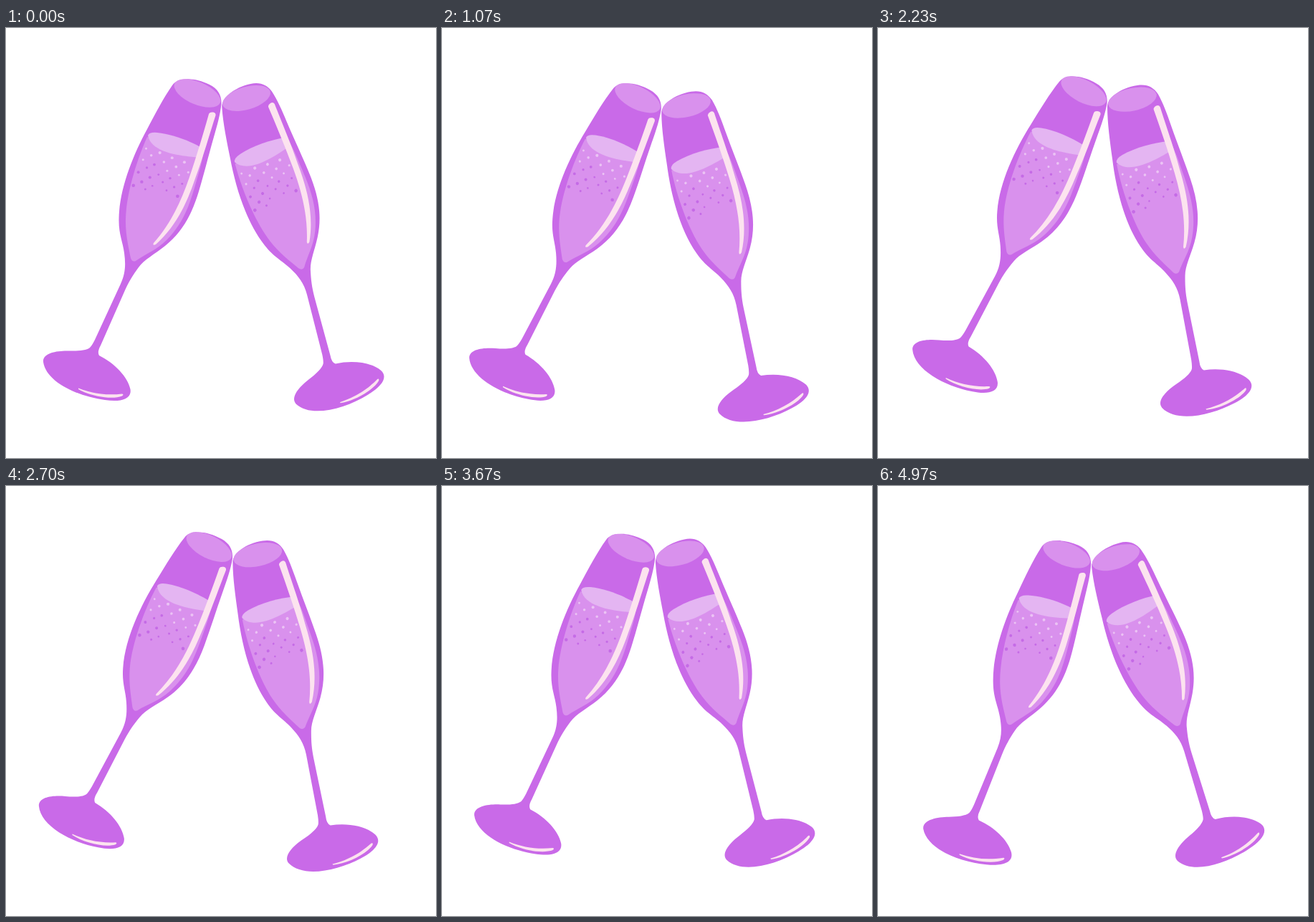
An HTML page that plays this animation: 600 by 600 pixels, repeating every 5.01 s.

```html
<!DOCTYPE html>
<html lang="en">
<head>
<meta charset="utf-8">
<title>Clinking glasses</title>
<style>
html, body { margin: 0; height: 100%; overflow: hidden; background: #fff; }
svg { display: block; width: 100vw; height: 100vh; }
</style>
</head>
<body>
<svg viewBox="0 0 600 600">
  <g id="pair">
    <g id="glass">
      <path fill="#c96ae8" d="M232 80C239 69 262 68 284 79C296 85 301 94 300.500 106C299 120 295 135 290 152C282 180 276 205 269 228C260 258 247 284 222 304C207 316 193 323 185 334C177 345 172 353 166 366L132 443Q127 452 130 457C152 468 170 487 173.500 504C176 519 158 522 138 519C100 514 56 494 52 466C51 453 72 450 88 450.500C100 451 112 450 117 446Q120 443 124 435L160 357C167 342 167 329 165 314C163 298 157 288 157.500 266C158 225 177 178 196.500 142C208 120 220 97 232 80Z"/>
      <ellipse fill="#d991ed" rx="34.5" ry="15.8" transform="translate(267 91) rotate(23)"/>
      <path fill="#d991ed" d="M197 152C182 185 168 232 167 266C166.500 288 171 305 174 321Q176 327 181 325C195 315 210 310 224 296C250 270 258 240 265 216C269 202 273 190 275 176Z"/>
      <path fill="#e4b5f2" d="M198 150Q200 145 211 146C232 148 258 158 275 168L274 181C246 179 203 175 198 150Z"/>
      <g id="bubbles"></g>
      <path fill="#fce3ef" d="M283 120Q284 117 289 117.500Q293 118 292.500 122C285 145 274 184 264 210C252 246 236 278 209 302Q204 304 206 300C228 275 243 246 256 208C265 182 276 145 283 120Z"/>
      <path fill="#fce3ef" d="M101 502.500C120 510 140 513 162 510.500Q165 511 162 513.500C148 519 118 514 101 504Z"/>
    </g>
    <use href="#glass" transform="translate(335.500 98) rotate(-39.05) translate(-267 -91)"/>
  </g>
</svg>
<script>
const LOOP = 5010, STEP = LOOP / 150;

let seed = 7;
const random = () => (seed = seed * 16807 % 2147483647) / 2147483647;

// Bubbles: staggered rows parallel to the liquid surface, pale on top, dark below
let bubbles = '';
for (let row = 0; row < 7; row++) {
  for (let i = 0; i < (row < 6 ? 4 : 2); i++) {
    const col = i + row % 2 / 2;
    const x = 197 + 17 * col - 3.4 * row + 3 * (random() - .5);
    const y = 167 + 7 * col + 8.6 * row + 3 * (random() - .5);
    const color = row + 3 * random() < 4 ? '#ebc3f4' : '#c56be6';
    bubbles += `<circle cx="${x}" cy="${y}" r="${1.2 + 1.2 * random()}" fill="${color}"/>`;
  }
}
document.getElementById('bubbles').innerHTML = bubbles;

// Turning points of the drift: seconds, contact point x and y, tilt in degrees
const keys = [
  [0, 300, 104, 2.8], [.63, 305.3, 109, 6.5], [.95, 307, 113, 6.8], [1.47, 294, 109, 0],
  [1.95, 320, 110, 7], [2.23, 319, 103, 6.5], [2.67, 315.5, 100, 6.3], [3.2, 314.5, 100.3, 8.8],
  [3.7, 295.3, 100, 2.9], [4.27, 290.6, 108, 1], [4.98, 297, 107, .5]];
const last = keys.length - 1;

const rise = (i, k) => (keys[i + 1][k] - keys[i][k]) / (keys[i + 1][0] - keys[i][0]);

// Monotone slope, so the curve never overshoots its keys
function slope(i, k) {
  const a = rise(Math.max(i - 1, 0), k), b = rise(Math.min(i, last - 1), k);
  return a * b > 0 ? 2 * a * b / (a + b) : 0;
}

function valueAt(t, k) {
  let i = 0;
  while (i < last - 1 && t >= keys[i + 1][0]) i++;
  const a = keys[i], b = keys[i + 1], h = b[0] - a[0], u = (t - a[0]) / h, v = 1 - u;
  return a[k] * v * v * (1 + 2 * u) + b[k] * u * u * (3 - 2 * u)
    + h * u * v * (slope(i, k) * v - slope(i + 1, k) * u);
}

const pair = document.getElementById('pair');
function draw() {
  const t = Math.floor(performance.now() % LOOP / STEP) * STEP / 1000;
  const [x, y, tilt] = [1, 2, 3].map(k => valueAt(t, k));
  pair.setAttribute('transform',
    `translate(${x} ${y}) rotate(${tilt - keys[0][3]}) translate(-300 -104)`);
  requestAnimationFrame(draw);
}
draw();
</script>
</body>
</html>
```
